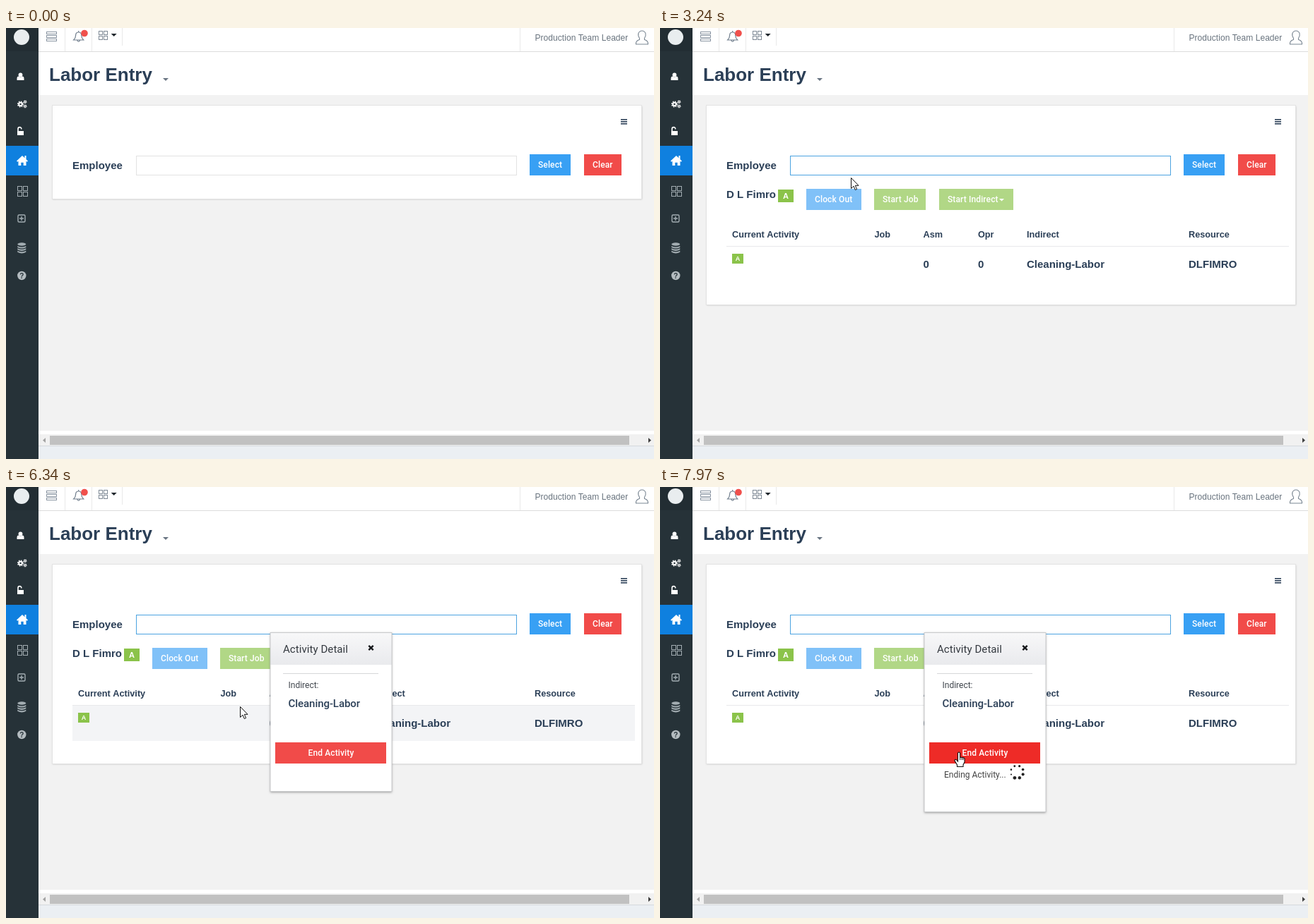
Write an HTML page with a canvas that moves like this. It is 917 px wide and 611 px high and loops after 8000 ms.

```html
<!DOCTYPE html>
<html lang="en">
<head>
<meta charset="utf-8">
<title>Labor Entry</title>
<style>
html, body { margin: 0; width: 100%; height: 100%; overflow: hidden; background: #f2f2f2; }
canvas { display: block; }
</style>
</head>
<body>
<canvas id="stage" width="917" height="611"></canvas>
<script>
const ctx = document.getElementById('stage').getContext('2d');
const LOOP = 8000;
const SANS = '"Liberation Sans", Arial, sans-serif';
const ROBOTO = 'Roboto, sans-serif';
const INK = '#2b3f57', RED = '#f14b49', GREEN = '#8bc34a';
const LOGIN = 'DLFIMRO', PERSON = 'D L Fimro', TASK = 'Cleaning-Labor';
const KEY_TIMES = [1450, 1690, 1830, 2000, 2150, 2230, 2310];
const CARET_ON = [[750, 1290], [1450, 3240], [4710, 6340], [6660, 7190], [7350, 7880]];
const T = { submit: 2700, popup: 4710, button: 6340, press: 7190, ending: 7350 };

// Progress 1/n .. 1 held in n steps between times a and b
function steps(t, a, b, n) {
  if (t < a) return 0;
  return Math.min(1, (Math.floor((t - a) / (b - a) * (n - 1) + 0.02) + 1) / n);
}
const lerp = (a, b, p) => a + (b - a) * p;
const between = (v, a, b) => v >= a && v < b;

function rect(x, y, w, h, color) {
  ctx.fillStyle = color;
  ctx.fillRect(x, y, w, h);
}
function frame(x, y, w, h, color, width = 1) {
  ctx.strokeStyle = color;
  ctx.lineWidth = width;
  ctx.strokeRect(x + 0.5, y + 0.5, w - 1, h - 1);
}
function dot(x, y, r, color) {
  ctx.fillStyle = color;
  ctx.beginPath();
  ctx.arc(x, y, r, 0, 7);
  ctx.fill();
}
function text(str, x, y, font, color, spacing = 0, align = 'left') {
  ctx.font = font;
  ctx.letterSpacing = spacing + 'px';
  ctx.textAlign = align;
  ctx.fillStyle = color;
  ctx.fillText(str, x, y);
}
function path(d, x, y, fill, stroke, width = 1) {
  const p = new Path2D(d);
  ctx.save();
  ctx.translate(x, y);
  if (fill) { ctx.fillStyle = fill; ctx.fill(p); }
  if (stroke) { ctx.strokeStyle = stroke; ctx.lineWidth = width; ctx.stroke(p); }
  ctx.restore();
}
function button(label, x, y, w, h, color, dx = 12) {
  rect(x, y, w, h, color);
  text(label, x + dx, y + 18.5, '500 12px ' + ROBOTO, '#fff', 0.12);
}
function badge(x, y, w, h, size) {
  rect(x, y, w, h, GREEN);
  text('A', x + w / 2, y + h / 2 + size * 0.36, `bold ${size}px ${SANS}`, '#fff', 0, 'center');
}
function grid(x, y, size, gap, color) {
  for (let i = 0; i < 4; i++)
    frame(x + (i % 2) * (size + gap), y + (i >> 1) * (size + gap), size, size, color);
}
function cog(x, y, r) {
  ctx.strokeStyle = '#fff';
  ctx.lineWidth = r * 0.55;
  ctx.beginPath();
  ctx.arc(x, y, r * 0.62, 0, 7);
  ctx.stroke();
  ctx.setLineDash([r * 0.4, r * 0.385]);
  ctx.beginPath();
  ctx.arc(x, y, r, 0, 7);
  ctx.stroke();
  ctx.setLineDash([]);
}

function drawSidebar() {
  const dim = '#a3adb2';
  rect(0, 0, 46, 611, '#263238');
  rect(0, 0, 46, 33, '#222d33');
  dot(22, 13, 11, '#e9edef');
  dot(20.5, 66.5, 2.9, '#fff');
  path('M-5 5V2.5Q-5-.5-2.5-.5Q0 1.5 2.5-.5Q5-.5 5 2.5V5Z', 20.5, 69, '#fff');
  cog(20.5, 108, 3.6);
  cog(27, 104.8, 2);
  cog(27, 111, 2);
  rect(16, 146, 9, 6, '#fff');
  path('M-2.5 5V1.5A2.4 2.4 0 0 1 2.3 1.5V2', 19.5, 141.5, null, '#fff', 1.6);
  rect(0, 167, 46, 42, '#0f80df');
  path('M0-7L8 .5L6.8 1.8L5.5.8V7H1.7V2.8H-1.7V7H-5.5V.8L-6.8 1.8L-8 .5ZM3.5-7H5.5V-2H3.5Z', 23, 188, '#fff');
  grid(16, 224, 7, 1, dim);
  path('M-3.5-5H3.5Q5-5 5-3.5V3.5Q5 5 3.5 5H-3.5Q-5 5-5 3.5V-3.5Q-5-5-3.5-5ZM-3 0H3M0-3V3', 22, 270, null, dim, 1.4);
  for (let i = 0; i < 4; i++)
    path(i ? 'M-6-1Q0 2 6-1V1Q0 4.4-6 1Z' : 'M-6 0A6 2.2 0 0 1 6 0A6 2.2 0 0 1-6 0', 22.3, 306.5 + i * 3.4, dim);
  dot(22.3, 351, 6.2, '#b4bcc0');
  text('?', 22.3, 354.6, 'bold 10px ' + SANS, '#263238', 0, 'center');
}

function drawHeader() {
  const line = '#6f7d8c';
  rect(46, 0, 871, 33, '#fff');
  rect(46, 33, 871, 1, '#dcdcdc');
  rect(46, 34, 871, 61, '#fff');
  for (const [x, h] of [[83, 33], [121, 33], [164, 25], [727, 33]]) rect(x, 0, 1, h, '#e9e9e9');
  for (const y of [5, 10, 15]) frame(57, y, 15, 4, '#8793a0');
  path('M-7 5Q-4 2-4-2Q-4-6 0-6Q4-6 4-2Q4 2 7 5ZM-2 5.5Q0 9 2 5.5M0-6V-8', 102.7, 12, null, line, 1.2);
  dot(111, 7.5, 4.8, '#f0504c');
  grid(131, 4, 6, 1, '#7d8894');
  path('M-4 0H4L0 4Z', 152.7, 8, '#20262c');
  text('Production Team Leader', 748.5, 18, '12px ' + SANS, '#68737e', 0.05);
  path('M-8.5 10Q-9 5-3.5 3.5V1.5Q-6-2-5-5.5Q-3.5-9 0-9Q3.5-9 5-5.5Q6-2 3.5 1.5V3.5Q9 5 8.5 10Z', 900, 13, null, '#7b8793', 1.1);
  text('Labor Entry', 61, 75, 'bold 26px ' + SANS, INK);
  path('M-4 0H4L0 4Z', 226, 71, '#6a7683');
}

function drawScrollbar() {
  rect(46, 571, 871, 5, '#fff');
  rect(46, 576, 871, 17, '#f1f1f1');
  rect(62, 578, 820, 13, '#c1c1c1');
  path('M2-3.5V3.5L-2 0Z', 54, 584.5, '#a3a3a3');
  path('M-2-3.5V3.5L2 0Z', 911, 584.5, '#404040');
  rect(46, 592, 871, 1, '#d5d9dd');
  rect(46, 593, 871, 18, '#ebeff3');
}

function drawField(t) {
  text('Employee', 94, 200, 'bold 15px ' + SANS, INK);
  rect(184, 181, 539, 28, '#fff');
  frame(184, 181, 539, 28, '#e2e2e2');
  ctx.globalAlpha = steps(t, 900, 1140, 4);
  frame(184, 181, 539, 28, '#4ca3e0');
  ctx.globalAlpha = 1;

  const typed = t < T.submit ? LOGIN.slice(0, KEY_TIMES.filter(k => k <= t).length) : '';
  text(typed, 196, 199, '12.5px ' + SANS, '#555');
  if (CARET_ON.some(([a, b]) => between(t, a, b)))
    rect(196 + Math.round(ctx.measureText(typed).width), 188, 1, 14, '#333');

  button('Select', 741, 179, 58, 30, '#38a0f4');
  button('Clear', 818, 179, 53, 30, RED);
}

function drawActivity(rowHover) {
  text(PERSON, 94, 241, 'bold 15px ' + SANS, INK);
  badge(167, 229, 22, 18, 11);
  button('Clock Out', 207, 228, 78, 30, '#80c1f8');
  button('Start Job', 303, 228, 73, 30, '#b1d786');
  button('Start Indirect', 395, 228, 105, 30, '#b1d786');
  path('M-3.5 0H3.5L0 3.5Z', 483.5, 242, '#fff');

  const heads = { 'Current Activity': 102, Job: 303.5, Asm: 372.5, Opr: 450, Indirect: 519, Resource: 748 };
  for (const name in heads) text(name, heads[name], 297, 'bold 12.7px ' + SANS, INK);
  if (rowHover) rect(94, 310, 796, 50, '#f3f4f6');
  rect(94, 309, 796, 1, '#e8e9eb');
  badge(102, 320, 16, 14, 9);
  const cells = [['0', 372.5], ['0', 450], [TASK, 519], [LOGIN, 748]];
  for (const [str, x] of cells) text(str, x, 340, 'bold 15px ' + SANS, INK);
}

function drawCard(t, rowHover) {
  const open = t >= T.submit;
  const h = open ? 283 : 133;
  ctx.save();
  ctx.shadowColor = 'rgba(0,0,0,.22)';
  ctx.shadowBlur = 2;
  ctx.shadowOffsetY = 1;
  rect(66, 110, 834, h - 1, '#fff');
  ctx.restore();
  frame(65, 109, 835, h + 1, '#e2e2e2');
  for (const y of [129, 132, 135]) rect(870, y, 9, 1.6, INK);
  drawField(t);
  if (open) drawActivity(rowHover);
}

function spinner(t) {
  const tick = Math.floor((t - T.ending) / 77.5 + 0.01);
  const lead = (-68 + tick * 22.5) * Math.PI / 180;
  for (let i = 0; i < 8; i++) {
    const a = lead - i * Math.PI / 4;
    dot(505.3 + 9 * Math.cos(a), 404 + 9 * Math.sin(a), 2.4 - i * 0.19, '#222');
  }
}

function endColor(t, hover) {
  if (!hover) return RED;
  if (t < T.press) return '#ee2b27';
  const p = steps(t, 7430, 7740, 5);
  return `rgb(${lerp(217, 238, p)}, ${lerp(42, 43, p)}, 39)`;
}

function drawPopup(t, hover) {
  const x = 374, y = 206, w = 172;
  const h = t < T.button ? 196 : t < T.ending ? 226 : 255;
  ctx.globalAlpha = steps(t, T.popup, 5100, 6);
  ctx.save();
  ctx.shadowColor = 'rgba(0,0,0,.35)';
  ctx.shadowBlur = 3;
  ctx.shadowOffsetY = 1;
  rect(x, y, w, h, '#fff');
  ctx.restore();
  const shade = ctx.createLinearGradient(0, y, 0, 252);
  shade.addColorStop(0, '#f8f8f9');
  shade.addColorStop(1, '#e9eaed');
  rect(x, y, w, 46, shade);
  frame(x - 0.5, y, w + 1, h, '#c9cacc');
  text('Activity Detail', 392, 235, '15px ' + ROBOTO, '#353a40', 0.07);
  path('M-3.2-3.2L3.2 3.2M3.2-3.2L-3.2 3.2', 516.5, 228, null, '#16191c', 2.4);
  rect(392, 264, 135, 1, '#d6d7d9');
  text('Indirect:', 399.5, 285, '12px ' + ROBOTO, '#40464d');
  text(TASK, 399.5, 312, '500 15px ' + ROBOTO, INK, -0.05);
  if (t >= T.button) button('End Activity', 381, 362, 157, 30, endColor(t, hover), 46.5);
  if (t >= T.ending) {
    text('Ending Activity...', 402, 412, '12px ' + ROBOTO, '#444');
    spinner(t);
  }
  ctx.globalAlpha = 1;
}

// Pointer hot spot over time
function pointer(t) {
  if (t < 70) return null;
  const move = (a, b, p) => ({ x: lerp(a[0], b[0], p), y: lerp(a[1], b[1], p) });
  const field = [241, 200], job = [358, 248], row = [332, 311], rest = [331, 311], end = [423, 376];
  if (t < 3240) {
    const p = (steps(t, 70, 750, 10) - 0.1) / 0.9;
    return move([799, 598], field, 1 - (1 - p) ** 1.6);
  }
  if (t < 4010) return move(field, job, steps(t, 3240, 3470, 4));
  if (t < 4430) return move(job, row, steps(t, 4010, 4160, 3));
  return move(rest, end, steps(t, 6660, 7040, 6));
}

function drawPointer(p, t, overEnd) {
  const x = Math.round(p.x), y = Math.round(p.y);
  const inside = (l, top, r, b) => between(p.x, l, r) && between(p.y, top, b);
  if (inside(184, 181, 723, 209)) {
    path('M-3-6.5H-1L0-5.5L1-6.5H3M0-5.5V6M-3 7H-1L0 6L1 7H3', x + 0.5, y, null, '#111', 1.2);
  } else if (t >= T.submit && inside(303, 228, 376, 258)) {
    for (const [color, width] of [['#fff', 4], ['#111', 2]])
      path('M6 0A6 6 0 1 1-6 0A6 6 0 1 1 6 0M-4-4L4 4', x + 0.5, y + 0.5, null, color, width);
  } else if (overEnd) {
    path('M-1.5 1Q0-1 1.6 1V7L4 7.4Q5.5 6.8 6 8Q7.5 7.5 8 9V14L6 18V20.5H-2.5V18L-6 12Q-6 9.5-3.8 10.5L-1.5 13Z', x, y, '#fff', '#111', 1.1);
    path('M1.6 7V11M4 8V11M6 8.5V11', x, y, null, '#111', 0.9);
  } else {
    path('M.5.5V15.5L4 12.2L6.3 17.5L8.6 16.5L6.3 11.3H11Z', x, y, '#fff', '#111', 1);
  }
}

function draw(t) {
  const p = pointer(t);
  const rowHover = p && between(p.y, 310, 360) && between(p.x, 94, 374);
  const overEnd = p && t >= T.button && between(p.y, 362, 392) && between(p.x, 381, 538);
  rect(0, 0, 917, 611, '#f2f2f2');
  drawHeader();
  drawCard(t, rowHover);
  drawScrollbar();
  drawSidebar();
  if (t >= T.popup) drawPopup(t, overEnd);
  if (p) drawPointer(p, t, overEnd);
}

const start = performance.now();
function tick() {
  draw((performance.now() - start) % LOOP);
  requestAnimationFrame(tick);
}
tick();
</script>
</body>
</html>
```
